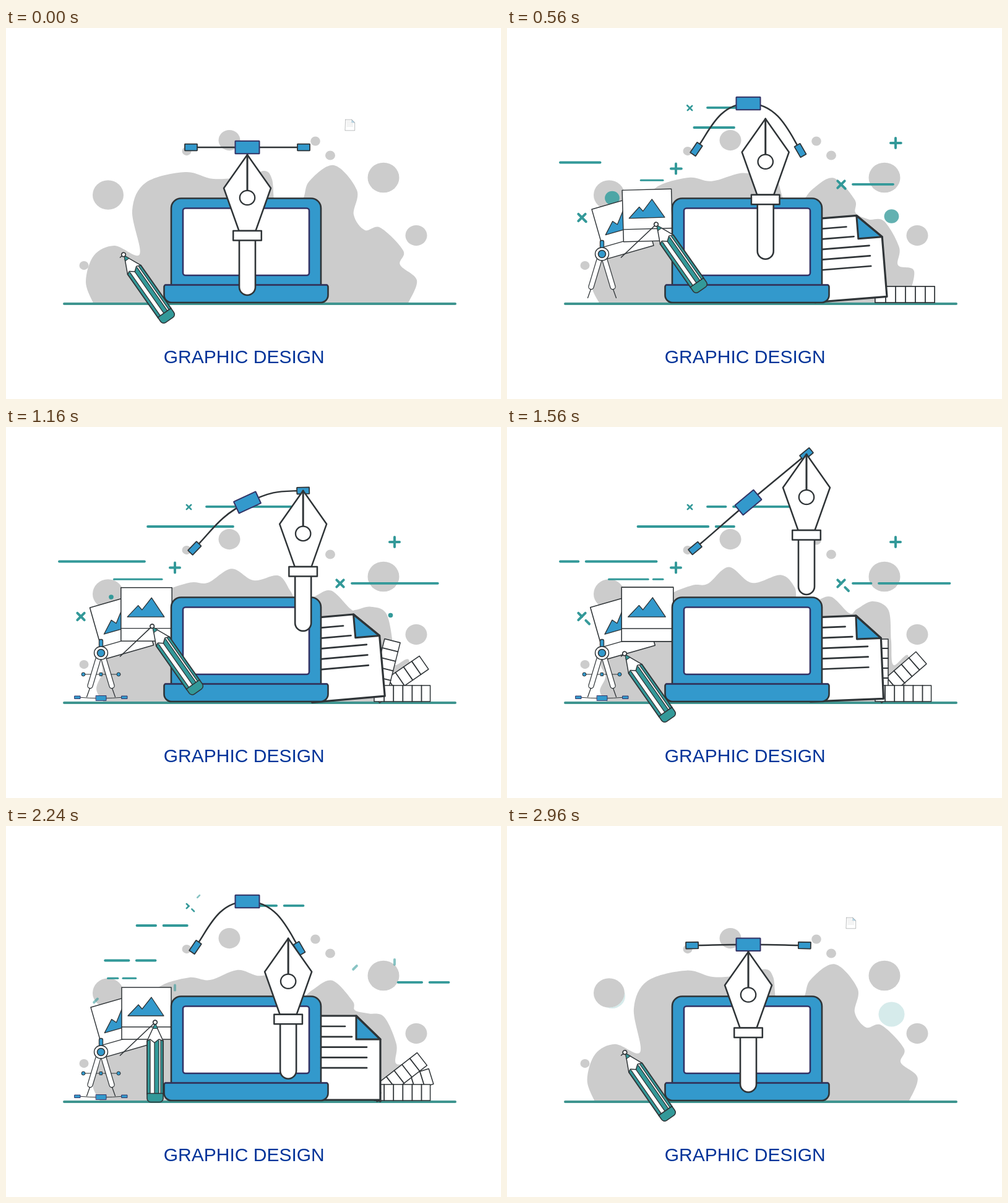
These frames come from a looping animation (800x600 px, 3 s). An HTML page with a canvas:

```html
<!DOCTYPE html>
<html lang="en">
<head>
<meta charset="utf-8">
<title>Graphic design</title>
<style>
html, body { margin: 0; width: 100%; height: 100%; overflow: hidden; background: #fff; }
canvas { display: block; }
</style>
</head>
<body>
<canvas id="c" width="800" height="600"></canvas>
<script>
const ctx = document.getElementById('c').getContext('2d');
const LOOP = 3000, STEP = 40;
const INK = '#2f3437', BLUE = '#3399cc', TEAL = '#339999', GRAY = '#cccccc', NAVY = '#333366';
const RAD = Math.PI / 180;
let t = 0;

const lin = (a, b) => Math.min(1, Math.max(0, (t - a) / (b - a)));
const ease = (a, b) => { const x = lin(a, b); return x * x * (3 - 2 * x); };
const mix = (a, b, p) => a + (b - a) * p;
// rises during a..b and falls during c..d
const hill = (a, b, c, d) => ease(a, b) * (1 - ease(c, d));

function paint(fill, stroke, w = 2.5) {
  if (fill) { ctx.fillStyle = fill; ctx.fill(); }
  if (stroke) { ctx.strokeStyle = stroke; ctx.lineWidth = w; ctx.stroke(); }
}
function box(x, y, w, h, r, fill, stroke, lw) {
  ctx.beginPath(); ctx.roundRect(x, y, w, h, r); paint(fill, stroke, lw);
}
function disc(x, y, rx, ry, fill, stroke, lw) {
  ctx.beginPath(); ctx.ellipse(x, y, rx, ry, 0, 0, 7); paint(fill, stroke, lw);
}
function poly(p, fill, stroke, lw) {
  ctx.beginPath();
  for (let i = 0; i < p.length; i += 2) ctx.lineTo(p[i], p[i + 1]);
  ctx.closePath(); paint(fill, stroke, lw);
}
function line(x1, y1, x2, y2, color, w) {
  ctx.beginPath(); ctx.moveTo(x1, y1); ctx.lineTo(x2, y2); paint(null, color, w);
}
function at(x, y, deg, s, draw) {
  ctx.save(); ctx.translate(x, y); ctx.rotate(deg * RAD); ctx.scale(s, s); draw(); ctx.restore();
}

// key points of the blob at rest and at half loop, joined by a smooth curve
const blobA = [141,445, 129,410, 142,368, 175,352, 216,366, 204,295, 226,250, 290,233, 335,244, 390,240, 418,231, 430,245,
  438,290, 477,280, 490,248, 530,222, 567,262, 562,302, 580,327, 605,323, 642,360, 637,383, 664,408, 650,445];
const blobB = [163,445, 151,428, 160,405, 152,380, 190,345, 240,300, 265,272, 300,257, 324,254, 357,226, 395,253, 443,239,
  466,258, 470,285, 500,282, 524,277, 553,303, 566,294, 592,280, 617,295, 620,345, 624,385, 648,369, 640,445];

function blob() {
  const u = 1 - Math.abs(t - 1500) / 1500, n = blobA.length / 2;
  const pt = i => {
    const k = 2 * Math.min(n - 1, Math.max(0, i));
    return [mix(blobA[k], blobB[k], u), mix(blobA[k + 1], blobB[k + 1], u)];
  };
  ctx.beginPath(); ctx.moveTo(...pt(0));
  for (let i = 0; i < n - 1; i++) {
    const [p0, p1, p2, p3] = [pt(i - 1), pt(i), pt(i + 1), pt(i + 2)];
    ctx.bezierCurveTo(p1[0] + (p2[0] - p0[0]) / 6, p1[1] + (p2[1] - p0[1]) / 6,
      p2[0] - (p3[0] - p1[0]) / 6, p2[1] - (p3[1] - p1[1]) / 6, p2[0], p2[1]);
  }
  ctx.closePath(); paint(GRAY);
}
function bubbles() {
  [[165, 270, 25], [361, 181.5, 17.5], [292, 199, 7.5], [500, 183, 7.8], [524, 206, 8], [610, 242, 25.5],
   [663, 335.5, 17.5], [126, 384, 7.5]].forEach(([x, y, r]) => disc(x, y, r, r * 0.95, GRAY));
}

// a long dash, a gap and a short dash run along each track
function track(x0, x1, y, w) {
  const d = Math.sign(x1 - x0), len = Math.abs(x1 - x0), k = len / 159;
  const head = 0.123 * (t - 11) * k;
  [[148.5, 0], [199.5, 158.5]].forEach(([tail, front]) => {
    const a = Math.max(0, head - tail * k), b = Math.min(len, head - front * k);
    if (b - a > 3) line(x0 + d * (a + 1), y, x0 + d * (b - 1.5), y, TEAL, w);
  });
}

// four arms fly in one after another, then leave in turn starting with arm `first`
function mark(x, y, size, turn, far, first, leave, gap) {
  for (let i = 0; i < 4; i++) {
    const come = 20 + 50 * i, go = leave + gap * ((i - first + 4) % 4);
    const p = lin(come, come + 400), q = lin(go, go + 400), a = p * (1 - q);
    if (a < 0.2) continue;
    const d = far * (1 - p) + 60 * q, deg = turn + 90 * i;
    ctx.globalAlpha = Math.min(1, a * 1.15);
    at(x, y, deg, size, () => line(d, 0, d + 8, 0, TEAL, 4));
    ctx.globalAlpha = 1;
  }
}
function marks() {
  [[273, 227.5], [628, 186]].forEach(([x, y]) => mark(x, y, 1, 90, 32, 1, 1590, 150));
  [[540, 253], [121, 306.5]].forEach(([x, y]) => mark(x, y, 1, 135, 60, 3, 1500, 180));
  mark(295.5, 129.5, 0.65, -45, 50, 0, 2040, 130);
}

// tinted discs shrink into solid dots; they only darken what is below
function dots() {
  const early = t >= 2960;
  const r = early ? 21 : mix(21, 8, lin(0, 800)) * (1 - lin(900, 1400));
  ctx.globalCompositeOperation = 'darken';
  [[170, 275, 1], [621.5, 304.5, 2]].forEach(([x, y, pow]) => {
    const a = early ? 0.2 : lin(0, 640) ** pow, soft = 255 - 102 * a;
    disc(x, y, r, r * 0.95, `rgb(${255 - 204 * a}, ${soft}, ${soft})`);
  });
  ctx.globalCompositeOperation = 'source-over';
}

function swatches() {
  const g = hill(100, 280, 2680, 2860);
  if (!g) return;
  const open = t < 1530 ? Math.sin(lin(560, 1500) * Math.PI / 2) : Math.cos(lin(1560, 2500) * Math.PI / 2);
  [-41, -90, 0].forEach(deg => at(603, 431, deg * open, g, () => {
    const cell = deg ? 16 : mix(16, 15.1, Math.min(1, open * 3));
    ctx.beginPath(); ctx.rect(-8, -13, cell * 6, 26); paint('#fff', INK, 1.5);
    for (let i = 1; i < 6; i++) line(-7 + cell * i, -13, -7 + cell * i, 13, INK, 1.8);
    disc(0, 0.5, 2.6, 2.6, BLUE, INK, 1.6);
  }));
}

function page() {
  const p = hill(0, 600, 2240, 2800), q = 1 - p;
  const tilt = -6 * hill(600, 840, 840, 2100);
  const x = q * q * 556 + 2 * q * p * 724 + p * p * 546 - tilt * 0.3;
  const y = q * q * 157 + 2 * q * p * 256 + p * p * 375 + tilt * 0.5;
  at(x, y, -360 * q + tilt, mix(0.13, 1, p), () => {
    const lw = mix(7, 3.2, p);
    const sheet = [-59, -68, 20, -68, 59, -30, 59, 68, -59, 68];
    poly(sheet, '#fff');
    ctx.globalAlpha = mix(0.35, 1, p);
    poly([20, -68, 59, -30, 20, -30], BLUE, INK, 3);
    poly(sheet, null, INK, lw);
    [2, 13, 37, 37, 37].forEach((end, i) => line(-42, -51 + 16.8 * i, end, -51 + 16.8 * i, INK, 2.7));
    ctx.globalAlpha = 1;
  });
}

function photo() {
  ctx.beginPath(); ctx.rect(-40, -42, 80, 84); paint('#fff', INK, 1.5);
  line(-40, 22, 40, 22, INK, 1.3);
  poly([-30, 4, -13, -14, -7, -7, 8, -26, 28, 4], BLUE, INK, 1.3);
}
function photos() {
  const out = lin(2500, 2900) ** 2;
  const grow = (a, b) => (1 - (1 - lin(a, b)) ** 2) * (1 - out);
  const puff = 1 + 0.045 * Math.sin(Math.PI * lin(840, 2240));
  const back = grow(90, 450), front = grow(225, 590);
  if (back > 0.02) at(187, 322.5, -16 + (t < 1500 ? -520 : 270) * (1 - back), back * puff, photo);
  if (front > 0.02) at(227, 303, -230 * (1 - front), front * puff, photo);
}

function compass() {
  const c = ease(120, 560) * (1 - lin(2440, 2840) ** 2);
  if (c < 0.03) return;
  const bar = ease(620, 980), foot = ease(700, 1060);
  at(153.5, 365.5, 0, 1, () => {
    if (bar > 0) {
      const l = -28.5 * bar * c, r = 28.5 * ease(620, 800) * c;
      line(l, 34.5, r, 34.5, INK, 1.2);
      [l, r].forEach(x => disc(x, 34.5, 3, 3, BLUE, INK, 1));
    }
    if (foot > 0) {
      const d = 38 * foot * c;
      ctx.beginPath(); ctx.moveTo(-d, 71.5); ctx.quadraticCurveTo(0, 75, d, 71.5); paint(null, INK, 1);
      [-d, d].forEach(x => box(x - 4.5, 69.5, 9, 4.5, 0, BLUE, NAVY, 1));
      if (foot > 0.6) box(-8, 69, 16.5 * c, 8 * c, 0, BLUE, NAVY, 1);
    }
    [-1, 1].forEach(s => at(0, 0, 0, c, () => {
      line(s * 18, 57, s * 23, 71, INK, 1.3);
      line(s * 4, 8, s * 17.5, 53, INK, 9.5);
      line(s * 4, 8, s * 17.5, 53, '#fff', 7);
    }));
    if (bar > 0) box(-2, 32, 4, 5, 0, BLUE, INK, 1);
    at(0, 0, 0, Math.sqrt(c), () => {
      box(-3, -22, 6, 13, 2.5, BLUE, INK, 1.3);
      disc(0, 0, 11, 10.5, '#fff', INK, 1.4);
      disc(0, 0, 6, 6, BLUE, INK, 1.6);
    });
  });
}

function laptop() {
  box(267, 275.5, 242, 145, [16, 16, 0, 0], BLUE, INK, 2.6);
  box(286, 291.5, 204, 108.5, 4, '#fff', NAVY, 2.6);
  box(255.5, 415.5, 265, 28.5, [3, 3, 12, 12], BLUE, INK, 2.6);
  line(257, 415.5, 519, 415.5, NAVY, 2.2);
}

function pencil() {
  const first = hill(0, 420, 1080, 1500);
  const second = hill(1560, 2160, 2280, 3000);
  const p = first + second;
  const x = mix(190, 241, p), y = mix(366.5, 317.5, p);
  line(184.5, 371, x, y, INK, 1.6);
  at(x, y, -35 * (1 - second), 1, () => {
    box(-13, 28, 26, 101, [0, 0, 6, 6], '#fff');
    [[-13, 5], [-1, 7], [9, 4]].forEach(([sx, w]) => { ctx.fillStyle = TEAL; ctx.fillRect(sx, 28, w, 88); });
    [-8, -1, 6, 9].forEach(sx => line(sx, 30, sx, 115, INK, 1.3));
    poly([0, 2, -13, 30, -8, 27.5, -1, 33, 6, 27.5, 13, 30], '#fff', INK, 1.5);
    poly([0, 2, -4, 10, 4, 10], TEAL, INK, 1);
    box(-13, 115, 26, 14, [0, 0, 6, 6], TEAL, INK, 1.6);
    [-13, 13].forEach(sx => line(sx, 30, sx, 116, INK, 1.8));
    disc(0, 0, 3.3, 3.3, '#fff', INK, 1.7);
  });
}

function curveTool() {
  const e = hill(0, 550, 2500, 3000), q = hill(720, 1480, 1640, 2130);
  const cx = 390, cy = mix(193, 122, e), tilt = -40 * q;
  const L = { x: mix(299, 306, e) - 2 * q, y: mix(193, 196, e), r: -56 * e + 16 * q };
  const R = { x: mix(481, 474, e) + 10 * q, y: mix(193, 198, e) - 154 * q, r: 60 * e - 100 * q };
  [[L, 1], [R, -1]].forEach(([h, s]) => {
    const c = s * Math.cos(h.r * RAD), n = s * Math.sin(h.r * RAD);
    ctx.beginPath();
    ctx.moveTo(h.x + 10 * c, h.y + 10 * n);
    ctx.bezierCurveTo(h.x + 40 * c, h.y + 40 * n,
      cx - s * 45 * Math.cos(tilt * RAD), cy - s * 45 * Math.sin(tilt * RAD), cx, cy);
    paint(null, INK, 2.5);
    at(h.x, h.y, h.r, 1, () => box(-10, -5.3, 20, 10.6, 0.5, BLUE, INK, 1.8));
  });
  at(cx, cy, tilt, 1, () => box(-19.5, -10.3, 39, 20.6, 0.5, BLUE, NAVY, 2));

  const go = hill(460, 720, 2130, 2500);
  at(mix(390, R.x, go), mix(mix(205, 121.5, e), R.y, go), 0, 1, () => {
    box(-13, 130, 26, 97, [0, 0, 13, 13], '#fff', INK, 2.6);
    poly([0, 0, -38, 54, -13.5, 123, 13.5, 123, 38, 54], '#fff', INK, 2.5);
    line(0, 0, 0, 58, INK, 3);
    disc(0, 69.5, 12.2, 11.7, '#fff', INK, 2.3);
    box(-22.8, 123, 45.6, 15.5, 0, '#fff', INK, 2.5);
  });
}

function draw() {
  ctx.fillStyle = '#fff'; ctx.fillRect(0, 0, 800, 600);
  ctx.lineCap = ctx.lineJoin = 'round';
  blob();
  bubbles();
  line(94, 446, 726, 446, '#3f9590', 4);
  track(323, 482, 128.8, 3.8);
  track(368, 210, 161, 3.8);
  track(85, 243, 217.5, 3.8);
  track(253, 163, 246.3, 3);
  track(558, 717, 252.8, 3.8);
  marks();
  swatches();
  page();
  dots();
  photos();
  compass();
  laptop();
  pencil();
  curveTool();
  ctx.font = '30px "Liberation Sans", Arial, sans-serif';
  ctx.fillStyle = '#003399';
  ctx.fillText('GRAPHIC DESIGN', 254.7, 542);
}

const start = performance.now();
function frame() {
  const ms = Math.max(0, performance.now() - start) % LOOP;
  t = Math.floor(ms / STEP) * STEP;
  draw();
  requestAnimationFrame(frame);
}
frame();
</script>
</body>
</html>
```
